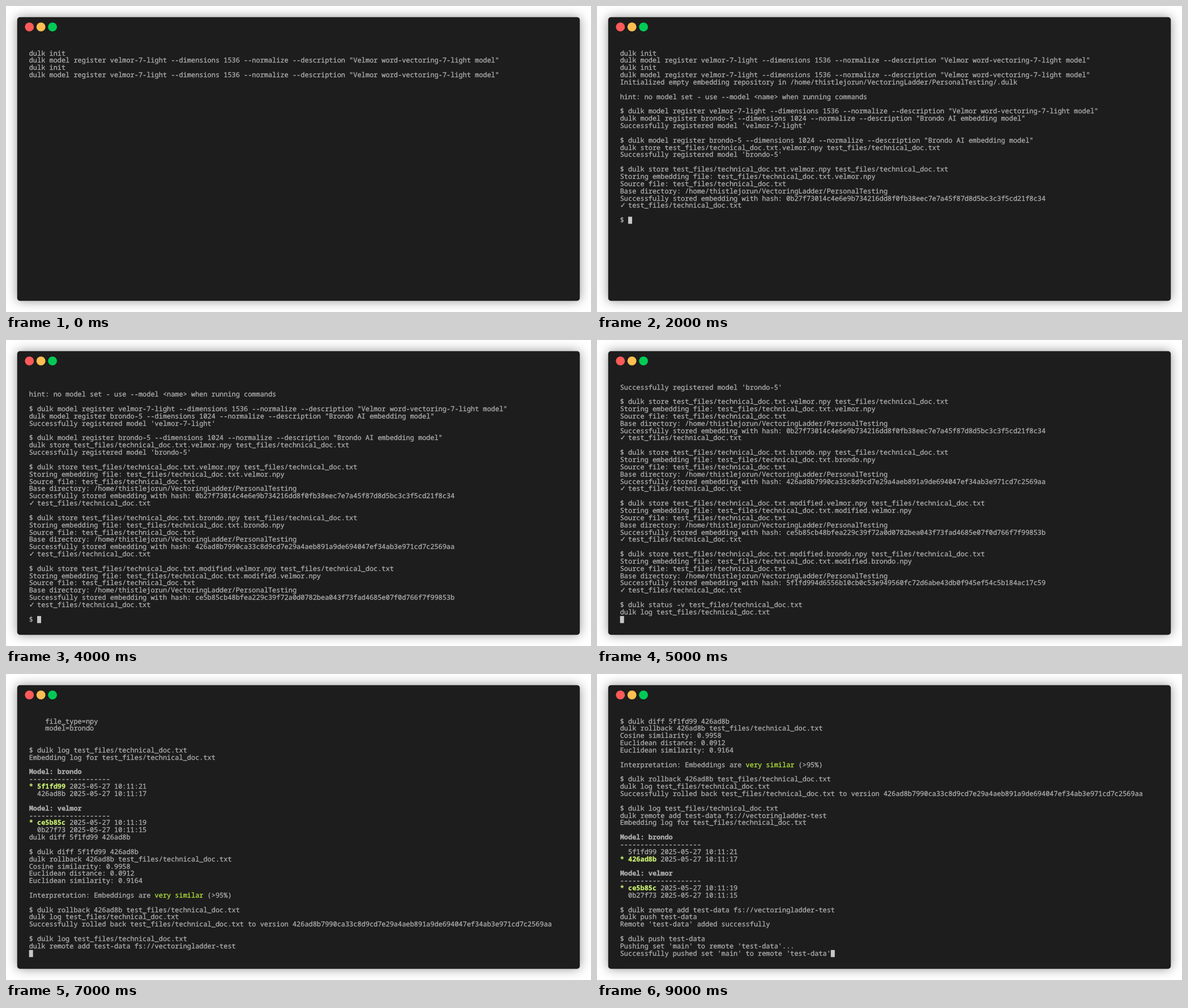
An HTML page with a canvas for the animation above (9.5 s loop, 1033 px wide and 542 px high).

```html
<!DOCTYPE html>
<html lang="en">
<head>
<meta charset="utf-8">
<title>Terminal session</title>
<style>
  html, body { margin: 0; width: 100%; height: 100%; overflow: hidden; background: #fff; }
  canvas { display: block; }
</style>
</head>
<body>
<canvas id="stage" width="1033" height="542"></canvas>
<script>
const LOOP = 9500;
const ROWS = 33;
const CELL = { w: 7.157, h: 12.85 };
const ORIGIN = { x: 40.7, y: 77.7 };
const ASCENT = 9.8;
const MARGIN = 19.75;
const FONT = '11.93px "Noto Sans Mono", "DejaVu Sans Mono", monospace';
const SYMBOL_FONT = '11.93px "DejaVu Sans", sans-serif';
const STYLES = [
  { color: "#afafaf", weight: "" },
  { color: "#afafaf", weight: "bold " },
  { color: "#c8ed71", weight: "bold " },
  { color: "#b3e33b", weight: "" }
];

// Style codes: escape character followed by an index into STYLES.
const ESC = "\x1b";
const styled = n => s => ESC + n + s + ESC + "0";
const bold = styled(1), hot = styled(2), green = styled(3);

const DOC = "test_files/technical_doc.txt";
const HOME = "/home/thistlejorun/VectoringLadder/PersonalTesting";
const HASH = {
  v1: "0b27f73014c4e6e9b734216dd8f0fb38eec7e7a45f87d8d5bc3c3f5cd21f8c34",
  b1: "426ad8b7990ca33c8d9cd7e29a4aeb891a9de694047ef34ab3e971cd7c2569aa",
  v2: "ce5b85cb48bfea229c39f72a0d0782bea043f73fad4685e07f0d766f7f99853b",
  b2: "5f1fd994d6556b10cb0c53e949560fc72d6abe43db0f945ef54c5b184ac17c59"
};

const register = (model, size, about) =>
  `dulk model register ${model} --dimensions ${size} --normalize --description "${about}"\n`;
const regVelmor = register("velmor-7-light", 1536, "Velmor word-vectoring-7-light model");
const regBrondo = register("brondo-5", 1024, "Brondo AI embedding model");
const registered = model => `Successfully registered model '${model}'\n\n`;

const store = kind => `dulk store ${DOC}.${kind}.npy ${DOC}\n`;
const stored = (kind, hash) =>
  `Storing embedding file: ${DOC}.${kind}.npy\n` +
  `Source file: ${DOC}\n` +
  `Base directory: ${HOME}\n` +
  `Successfully stored embedding with hash: ${hash}\n` +
  `✓ ${DOC}\n\n$ `;

const current = (hash, model, stamp) =>
  hot("→ Current Embedding") + "\n" +
  `  Hash: ${hash}\n  Model: ${model}\n  Metadata:\n` +
  `    source_file=${DOC}\n    timestamp=${stamp}\n` +
  `    file_type=npy\n    model=${model}\n\n`;

const entry = (hash, sec, active) => {
  const id = hash.slice(0, 7);
  return (active ? hot("* " + id) : "  " + id) + ` 2025-05-27 10:11:${sec}\n`;
};
const history = (model, ...entries) =>
  bold("Model: " + model) + "\n" + "-".repeat(20) + "\n" + entries.join("");

const logCmd = `dulk log ${DOC}\n`;
const logHead = `Embedding log for ${DOC}\n\n`;
const velmorLog = history("velmor", entry(HASH.v2, 19, true), entry(HASH.v1, 15, false));
const diffCmd = "dulk diff 5f1fd99 426ad8b\n";
const rollCmd = `dulk rollback 426ad8b ${DOC}\n`;
const remoteCmd = "dulk remote add test-data fs://vectoringladder-test\n";
const pushCmd = "dulk push test-data\n";

// Each step appends its text; the cursor stands at the end.
const steps = [
  [0, ("dulk init\n" + regVelmor).repeat(2)],
  [500, `Initialized empty embedding repository in ${HOME}/.dulk\n\n` +
    "hint: no model set - use --model <name> when running commands\n\n" +
    "$ " + regVelmor + regBrondo],
  [1000, registered("velmor-7-light") + "$ " + regBrondo + store("velmor")],
  [1500, registered("brondo-5") + "$ " + store("velmor")],
  [2000, stored("velmor", HASH.v1)],
  [3000, store("brondo") + stored("brondo", HASH.b1)],
  [3500, store("modified.velmor")],
  [4000, stored("modified.velmor", HASH.v2)],
  [4500, store("modified.brondo")],
  [5000, stored("modified.brondo", HASH.b2) + `dulk status -v ${DOC}\n` + logCmd],
  [5500, current(HASH.v2, "velmor", 1748358679) +
    current(HASH.b2, "brondo", 1748358681) + "\n$ " + logCmd],
  [6000, logHead +
    history("brondo", entry(HASH.b2, 21, true), entry(HASH.b1, 17, false)) + "\n" +
    velmorLog + diffCmd + "\n$ " + diffCmd + rollCmd],
  [6500, "Cosine similarity: 0.9958\nEuclidean distance: 0.0912\n" +
    "Euclidean similarity: 0.9164\n\n" +
    `Interpretation: Embeddings are ${green("very similar")} (>95%)\n\n` +
    "$ " + rollCmd + logCmd],
  [7000, `Successfully rolled back ${DOC} to version ${HASH.b1}\n\n` +
    "$ " + logCmd + remoteCmd],
  [7500, logHead +
    history("brondo", entry(HASH.b2, 21, false), entry(HASH.b1, 17, true)) + "\n" +
    velmorLog + "\n$ " + remoteCmd + pushCmd],
  [8000, "Remote 'test-data' added successfully\n\n$ " + pushCmd],
  [8500, "Pushing set 'main' to remote 'test-data'...\n"],
  [9000, "Successfully pushed set 'main' to remote 'test-data'"]
];

let buffer = "";
const screens = steps.map(([time, text]) => {
  buffer += text;
  return { time, lines: buffer.split("\n").slice(-ROWS) };
});

const canvas = document.getElementById("stage");
const ctx = canvas.getContext("2d");
ctx.textRendering = "geometricPrecision";
ctx.font = FONT;
ctx.lineWidth = 0.3;
ctx.lineJoin = "round";
const spacing = CELL.w - ctx.measureText("m".repeat(100)).width / 100;
ctx.letterSpacing = spacing + "px";

const colX = col => ORIGIN.x + col * CELL.w;
const rowY = row => ORIGIN.y + row * CELL.h;

function drawWindow() {
  const { width, height } = canvas;
  ctx.fillStyle = "#fff";
  ctx.fillRect(0, 0, width, height);
  ctx.save();
  ctx.shadowColor = "rgba(0,0,0,.42)";
  ctx.shadowBlur = 19;
  ctx.fillStyle = "#1d1d1d";
  ctx.beginPath();
  ctx.roundRect(MARGIN, MARGIN, width - 2 * MARGIN, height - 2 * MARGIN, 5);
  ctx.fill();
  ctx.restore();
  ["#ff5a5a", "#ffbe50", "#00ca56"].forEach((color, i) => {
    ctx.fillStyle = color;
    ctx.beginPath();
    ctx.arc(41.3 + i * 20.4, 37.2, 7.9, 0, Math.PI * 2);
    ctx.fill();
  });
}

function drawLine(line, row) {
  const y = rowY(row) + ASCENT;
  let col = 0;
  let style = STYLES[0];
  // Symbols are placed alone so that a wider glyph cannot push the row.
  for (const part of line.match(/\x1b\d|[✓→]|[^\x1b✓→]+/g) || []) {
    if (part[0] === ESC) {
      style = STYLES[+part[1]];
      continue;
    }
    ctx.font = style.weight + (/[✓→]/.test(part) ? SYMBOL_FONT : FONT);
    ctx.fillStyle = ctx.strokeStyle = style.color;
    ctx.fillText(part, colX(col), y);
    ctx.strokeText(part, colX(col), y);
    col += part.length;
  }
}

function drawScreen({ time, lines }) {
  drawWindow();
  lines.forEach(drawLine);
  if (time === 0) return;
  const row = lines.length - 1;
  ctx.fillStyle = "#c7c7c7";
  ctx.fillRect(colX(lines[row].length), rowY(row), 7, 12.5);
}

let shown = null;
function frame() {
  const t = performance.now() % LOOP;
  const screen = screens.findLast(s => s.time <= t);
  if (screen !== shown) drawScreen(shown = screen);
  requestAnimationFrame(frame);
}
frame();
</script>
</body>
</html>
```
